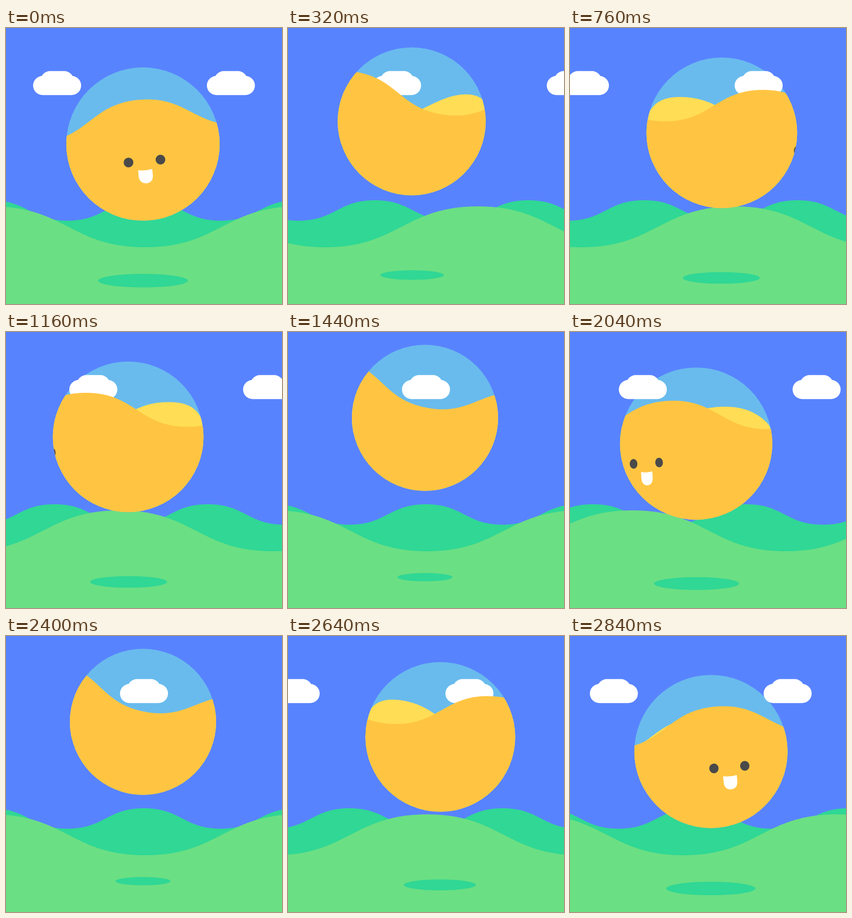
An HTML page with a canvas for the animation above (2880 ms loop, 540x540 px).

```html
<!DOCTYPE html>
<html lang="en">
<head>
<meta charset="utf-8">
<title>Bouncing planet</title>
<style>
  html, body { margin: 0; width: 100%; height: 100%; overflow: hidden; background: #5883ff; }
  canvas { display: block; width: 100%; height: 100%; }
</style>
</head>
<body>
<canvas id="stage" width="540" height="540"></canvas>
<script>
const ctx = document.getElementById('stage').getContext('2d');
const SIZE = 540, CYCLE = 960, STEP = 40, TAU = Math.PI * 2;
const COLOR = {
  sky: '#5883ff', farHill: '#30d795', nearHill: '#6bdf83', air: '#69bbed',
  sand: '#ffc542', farSand: '#ffdd55', eye: '#4a4a4a', white: '#fff'
};

// Periodic wave made of S-curves: -1 at a crest (d = 0), 1 at a trough (d = half).
function wave(d, half) {
  const handle = 0.48;
  let m = (d / half % 2 + 2) % 2;
  if (m > 1) m = 2 - m;
  let lo = 0, hi = 1;
  for (let i = 0; i < 18; i++) {
    const s = (lo + hi) / 2, r = 1 - s;
    const x = 3 * handle * s * r * r + 3 * (1 - handle) * s * s * r + s * s * s;
    if (x < m) lo = s; else hi = s;
  }
  return 2 * lo * lo * (3 - 2 * lo) - 1;
}

function fillBelow(color, from, to, bottom, height) {
  ctx.fillStyle = color;
  ctx.beginPath();
  ctx.moveTo(from, bottom);
  for (let x = from; x <= to; x += 2) ctx.lineTo(x, height(x));
  ctx.lineTo(to, bottom);
  ctx.fill();
}

function ellipse(color, x, y, rx, ry) {
  ctx.fillStyle = color;
  ctx.beginPath();
  ctx.ellipse(x, y, rx, ry, 0, 0, TAU);
  ctx.fill();
}

function hill(color, crest, half, mid, amp) {
  fillBelow(color, 0, SIZE, SIZE, x => mid + amp * wave(x - crest, half));
}

function cloud(x) {
  ctx.fillStyle = COLOR.white;
  ctx.beginPath();
  ctx.roundRect(x, 93.7, 94, 37.5, 18.75);
  ctx.roundRect(x + 14.5, 84.2, 65, 37.5, 18.75);
  ctx.fill();
}

function face(u) {
  const t = (u > 0.5 ? u - 1 : u) * CYCLE;
  if (Math.abs(t) > 260) return;
  ctx.save();
  ctx.translate(-800 * t / CYCLE, 0);
  ctx.scale(1 - 0.45 * Math.pow(Math.abs(t) / 200, 1.6), 1);
  for (const x of [-31.4, 31.4]) ellipse(COLOR.eye, x, 33.4, 9.5, 9.5);
  ctx.fillStyle = COLOR.white;
  ctx.beginPath();
  ctx.moveTo(-14, 50);
  ctx.quadraticCurveTo(0, 53, 13.7, 50);
  ctx.lineTo(13.8, 62);
  ctx.bezierCurveTo(13.8, 72, 8, 77, 0, 77);
  ctx.bezierCurveTo(-8, 77, -14, 72, -14, 62);
  ctx.fill();
  ctx.restore();
}

function planetSurface(u, x, y, r) {
  const tilt = 2.8 - 7.9 * Math.cos(u * TAU - 0.035);
  const front = p => -54 + 33 * wave(p + 400 * u, 200);
  // The far rim mirrors the near one and bends to meet it at the edge.
  const back = p => {
    const edge = Math.min(1, Math.abs(p) / 148);
    const bend = 1 - Math.sqrt(1 - Math.pow(edge, 9.7));
    const far = -37 + 33 * wave(p - 400 * u, 200);
    return far + (front(p) - far) * bend;
  };
  ctx.save();
  ctx.beginPath();
  ctx.arc(x, y, r, 0, TAU);
  ctx.clip();
  ctx.translate(x, y);
  ctx.rotate(tilt * Math.PI / 180);
  ctx.scale(r / 150, r / 150);
  fillBelow(COLOR.farSand, -152, 152, 60, back);
  fillBelow(COLOR.sand, -160, 160, 180, front);
  face(u);
  ctx.restore();
}

function draw(u) {
  const c = Math.cos(u * TAU), s = Math.sin(u * TAU);
  const x = 268 - 30 * s, y = 197.5 + 29.6 * c, r = 146.5 + 3.5 * c;

  ctx.fillStyle = COLOR.sky;
  ctx.fillRect(0, 0, SIZE, SIZE);
  hill(COLOR.farHill, 270 + 600 * u, 150, 357, 20);
  hill(COLOR.nearHill, 572 + 1200 * u, 300, 389, 40);
  ellipse(COLOR.farHill, 268 - 29 * s, 487 + 7.3 * c, 70.8 + 17.1 * c, 10.7 + 2.6 * c);
  ellipse(COLOR.air, x, y, r, r);
  for (let k = -1; k <= 1; k++) cloud(53 + 340 * (u + k));
  planetSurface(u, x, y, r);
}

const start = performance.now();
function tick() {
  const t = Math.floor((performance.now() - start) / STEP) * STEP;
  draw(t % CYCLE / CYCLE);
  requestAnimationFrame(tick);
}
tick();
</script>
</body>
</html>
```
